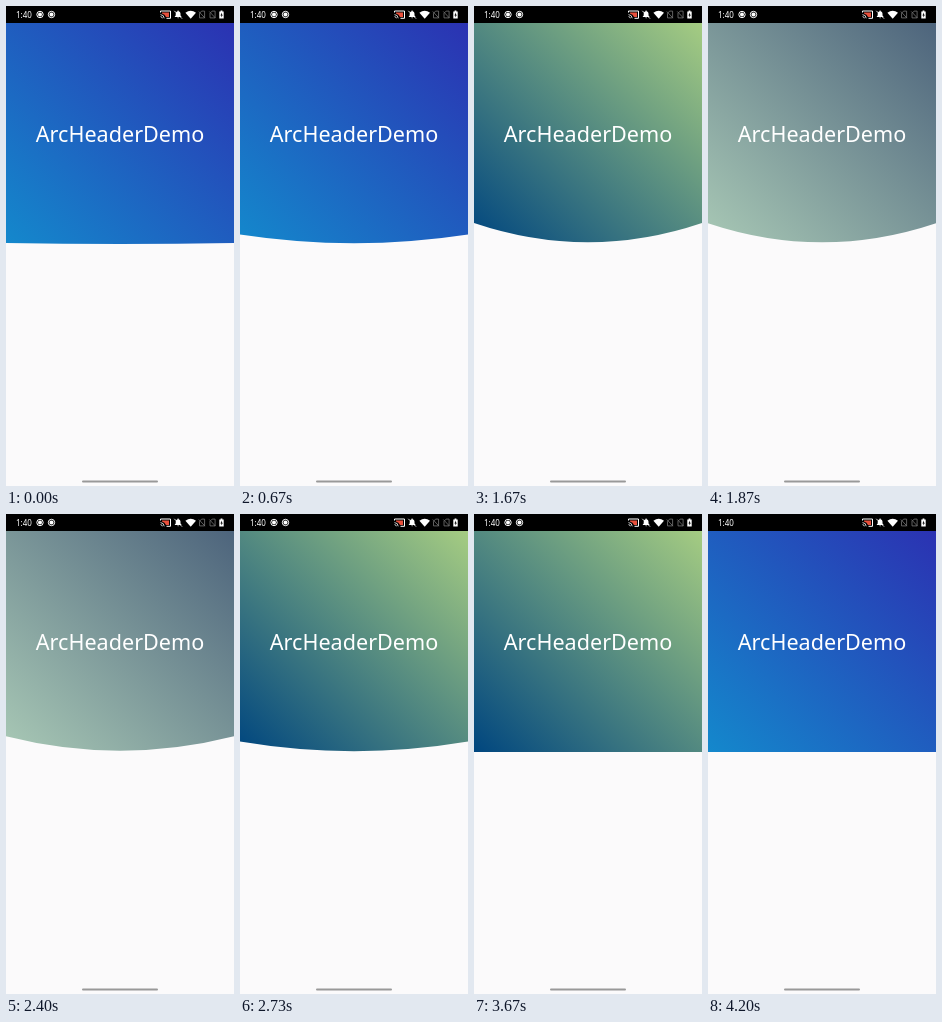
Animation, 228 px wide and 480 px high, one loop 4670 ms. Source, as an HTML page:

```html
<!DOCTYPE html>
<html lang="en">
<head>
<meta charset="utf-8">
<title>Arc header</title>
<style>
  html, body { margin: 0; height: 100%; overflow: hidden; background: #fbfafb; }
  svg { display: block; width: 228px; height: 480px; }
  text { font-family: "Noto Sans", "Open Sans", sans-serif; fill: #fff; }
</style>
</head>
<body>
<svg viewBox="0 0 228 480">
  <defs>
    <linearGradient id="blue" x1="0" y1="1" x2="1" y2="0">
      <stop stop-color="#1488cc"/><stop offset="1" stop-color="#2b32b2"/>
    </linearGradient>
    <linearGradient id="green" x1="0" y1="1" x2="1" y2="0">
      <stop stop-color="#00467f"/><stop offset="1" stop-color="#a5cc82"/>
    </linearGradient>
    <linearGradient id="grey" x1="0" y1="1" x2="1" y2="0">
      <stop stop-color="#a8c8b5"/><stop offset="1" stop-color="#4d647c"/>
    </linearGradient>
    <g id="dot">
      <circle r="3.2" fill="none" stroke="#fff" stroke-width="1"/>
      <circle r="2" fill="#fff"/>
    </g>
    <g id="sim" fill="none" stroke="#777" stroke-width=".8">
      <path d="M-2.5 3.4V-1.2L-.4-3.4H2.6V3.4ZM-3.2-3L3 3.6"/>
    </g>
  </defs>

  <path id="header"/>
  <text x="114" y="136" font-size="21.6" text-anchor="middle">ArcHeaderDemo</text>

  <rect width="228" height="17"/>
  <text x="10" y="11.5" font-size="8">1:40</text>
  <g id="dots">
    <use href="#dot" x="34" y="8.5"/>
    <use href="#dot" x="45.5" y="8.5"/>
  </g>
  <!-- cast, muted bell, wifi, two empty slots, battery -->
  <path d="M154.5 6.5V5H164.5V12.3H160.5" fill="none" stroke="#fff"/>
  <path d="M156 6.5H163V11H160Q159 8 156 7.5Z" fill="#e8503c"/>
  <path d="M154.5 8.6Q158 8.8 158.2 12.3M154.5 10.6Q156.2 10.6 156.3 12.3" fill="none" stroke="#fff" stroke-width=".8"/>
  <path d="M168.8 11V10.4L169.7 9.5V7.6Q169.9 5.6 171.6 5.3V4.5H172.6V5.3Q174.4 5.6 174.5 7.6V9.5L175.4 10.4V11ZM171.2 11.6H173L172.1 12.5Z" fill="#fff"/>
  <path d="M168.3 4.8L176 12.6" stroke="#fff" stroke-width=".9"/>
  <path d="M179.4 6.8Q184.7 2.9 190 6.8L184.7 12.7Z" fill="#fff"/>
  <use href="#sim" x="196" y="8.5"/>
  <use href="#sim" x="206.5" y="8.5"/>
  <path d="M213.3 5.6H214.6V4.6H216.4V5.6H217.7V12.6H213.3Z" fill="#fff"/>
  <path d="M215.9 6.6L214.4 9.4H215.4V11.5L216.8 8.7H215.9Z"/>

  <rect x="76" y="474.6" width="76" height="2" rx="1" fill="#999"/>
</svg>
<script>
  const LOOP = 4670, STEP = 200 / 3, CYCLE = 4000, LEAD = 270;
  const FILLS = ["blue", "green", "grey", "green", "blue"];
  const header = document.getElementById("header");
  const dots = document.getElementById("dots");

  function draw(t) {
    // The arc bends and flattens once per cycle; each quarter has its own gradient.
    const phase = Math.min((t + LEAD) / CYCLE, 1);
    const bend = Math.sin(Math.PI * phase) ** 2;
    const edge = 238 - 21 * bend;
    const middle = 238 - 1.7 * bend;
    header.setAttribute("d", `M0 17H228V${edge}Q114 ${2 * middle - edge} 0 ${edge}Z`);
    header.setAttribute("fill", `url(#${FILLS[Math.floor(phase * 4)]})`);
    dots.setAttribute("opacity", Math.min(1, Math.max(0, (4200 - t) / 200)));
  }

  const start = performance.now();
  function tick() {
    const t = (performance.now() - start) % LOOP;
    draw(Math.floor((t + 5) / STEP) * STEP);
    requestAnimationFrame(tick);
  }
  tick();
</script>
</body>
</html>
```
